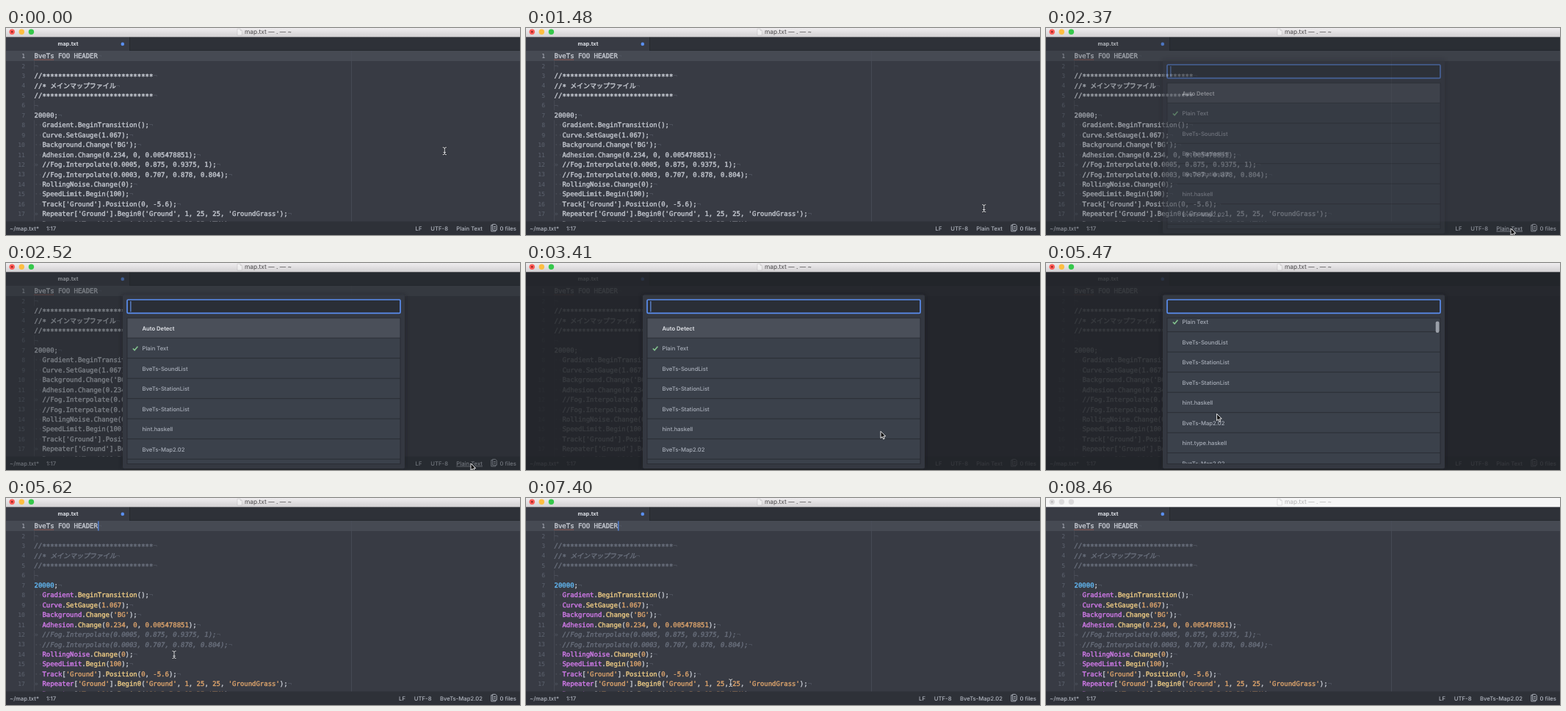
Recreate the animation shown at these times as an HTML page. Size 700x282 px, loop 8.56 s.

```html
<!DOCTYPE html>
<html lang="en">
<head>
<meta charset="utf-8">
<title>Editor</title>
<style>
html, body { margin: 0; width: 100%; height: 100%; overflow: hidden; background: #383b44; }
svg { display: block; width: 100vw; height: 100vh; }
text { fill: currentColor; font-family: Inter, sans-serif; font-size: 7.7px; font-weight: 500; text-rendering: geometricPrecision; }
.code text, .nums text { font: 8.96px "DejaVu Sans Mono", "Noto Sans CJK JP", "Noto Sans CJK", monospace; }
.code text { color: #c3c7cf; stroke: currentColor; stroke-width: .4px; }
.code .mark { color: #525762; stroke: none; }
.code .star { baseline-shift: -.8px; }
.nums text { font-size: 8.1px; color: #5d636f; text-anchor: end; }
.lit .c { color: #686e7b; font-style: italic; }
.lit .w { color: #d27bea; }
.lit .f { color: #ecca84; }
.lit .n, .lit .s { color: #daa26b; }
.lit .b { color: #62b8f3; }
.status { color: #b2b7c1; }
.end { text-anchor: end; }
.list { color: #a9afba; }
.bar { fill: url(#chrome); }
.title { color: #4a484a; font-size: 8.4px; font-weight: 400; }
.page { opacity: .5; }
.idle .bar { fill: #f6f6f6; }
.idle .title { color: #b4b3b4; }
.idle .light { fill: #dcdbdc; }
.idle .dirty { fill: #b4b3b4; }
</style>
</head>
<body>
<svg viewBox="0 0 700 282" preserveAspectRatio="none">
  <defs>
    <linearGradient id="chrome" x2="0" y2="1"><stop stop-color="#efedef"/><stop offset="1" stop-color="#d2d0d2"/></linearGradient>
    <clipPath id="pane"><rect y="31" width="700" height="233"/></clipPath>
    <clipPath id="rows"><rect x="165" y="75" width="372" height="199"/></clipPath>
    <filter id="soft" x="-10%" y="-10%" width="120%" height="120%"><feGaussianBlur stdDeviation="3"/></filter>
    <path id="ibeam" d="M-2.2 -5Q0 -5 0 -3.6Q0 -5 2.2 -5M0 -3.6V3.6M-1.4 1.8H1.4M-2.2 5Q0 5 0 3.6Q0 5 2.2 5"/>
  </defs>

  <g id="editor">
    <rect width="700" height="282" fill="#383b44"/>
    <rect y="12" width="700" height="19" fill="#2e3138"/>
    <rect y="12" width="168" height="19" fill="#383b44"/>
    <path d="M168.5 12V31M168.5 30.7H700" stroke="#24272d" stroke-width=".8"/>
    <text x="70.5" y="24.1" color="#dfe2e8" style="font-size:7.4px;font-weight:700">map.txt</text>
    <circle cx="158.8" cy="21.9" r="2.3" fill="#5a8ff0"/>
    <rect y="31" width="700" height="14" fill="#464a53"/>
    <path d="M470.5 31V264" stroke="#4b4f59" stroke-width=".8"/>
    <path d="M38.5 45V58.5M38.5 98.5V112M38.5 125.5V264" stroke="#4b4f59" stroke-width=".7"/>
    <g clip-path="url(#pane)"><g class="nums" id="nums"></g><g class="code" id="code"></g></g>
    <path d="M38.5 43.2H65" stroke="#d0604f" stroke-width="1" stroke-dasharray="1 1.1"/>
    <rect id="caret" x="125.2" y="31.5" width="1.2" height="13" fill="#5a90f2"/>

    <g class="status">
      <rect y="263.5" width="700" height="18.5" fill="#2e3138"/>
      <text x="5" y="275.7">~/map.txt*</text>
      <text x="55" y="275.7">1:17</text>
      <g id="enc">
        <text class="end" x="566.5" y="275.7">LF</text>
        <text class="end" x="602" y="275.7">UTF-8</text>
      </g>
      <text class="end" id="lang" x="649" y="275.7"></text>
      <g fill="none" stroke="#b2b7c1" stroke-width=".9">
        <path d="M662.5 268.5H660.8V277H666.8V275.5"/>
        <path d="M662.7 267.4H666.5L668.3 269.2V275.3H662.7ZM664 270.5H667M664 272.7H667"/>
      </g>
      <text class="end" x="695" y="275.7">0 files</text>
    </g>
  </g>

  <rect id="dim" y="12" width="700" height="270" fill="#212428"/>

  <g id="modal">
    <rect x="159" y="44" width="384" height="236" rx="2" fill="#15171a" opacity=".5" filter="url(#soft)"/>
    <rect x="159" y="43.5" width="384" height="236.5" rx="2" fill="#343841"/>
    <rect x="165" y="50" width="372" height="18.4" rx="1.5" fill="#2a2e36" stroke="#5b8def" stroke-width="1.7"/>
    <rect id="prompt" x="169.3" y="52" width="1.1" height="14.5" fill="#6a9bf5"/>
    <g clip-path="url(#rows)">
      <rect x="165" y="75" width="372" height="199" fill="#3b414b"/>
      <g class="list" id="list"></g>
    </g>
    <rect x="165" y="75" width="372" height="198.7" fill="none" stroke="#282b32" stroke-width=".9"/>
    <rect id="thumb" x="530.7" width="4.8" height="15.5" rx="2.2" fill="#9a9fa8"/>
  </g>

  <g id="window">
    <rect class="bar" width="700" height="12.3"/>
    <circle class="light" cx="8.2" cy="5.2" r="3.7" fill="#fc5b57"/>
    <circle class="dirty" cx="8.2" cy="5.2" r="1.2" fill="#8e1d18"/>
    <circle class="light" cx="21.3" cy="5.2" r="3.7" fill="#fdbe41"/>
    <circle class="light" cx="34.4" cy="5.2" r="3.7" fill="#35c84b"/>
    <path class="page" d="M315 1.2H319L321.3 3.5V10H315ZM319 1.2V3.5H321.3" fill="#fff" stroke="#a5a3a5" stroke-width=".6"/>
    <text class="title" x="325" y="8.3">map.txt — . — ~</text>
  </g>

  <g id="mouse">
    <g id="beam" fill="none" stroke-linecap="round">
      <use href="#ibeam" stroke="#26282d" stroke-width="2"/>
      <use href="#ibeam" stroke="#eceef2" stroke-width=".9"/>
    </g>
    <path id="arrow" d="M0 0V9.3L2.2 7.3L3.6 10.6L5.2 9.9L3.8 6.7H6.7Z" fill="#0c0c0d" stroke="#fff" stroke-width=".9" stroke-linejoin="round"/>
  </g>
</svg>
<script>
const $ = id => document.getElementById(id);
const LOOP = 8560, TICK = 148.2;
const LEFT = 38.6, COL = 5.394, ROW = 13.44, ITEM = 27.5;

const stars = '//' + '*'.repeat(28);
const source = `BveTs FOO HEADER

${stars}
//* メインマップファイル
${stars}

20000;
  Gradient.BeginTransition();
  Curve.SetGauge(1.067);
  Background.Change('BG');
  Adhesion.Change(0.234, 0, 0.005478851);
\t//Fog.Interpolate(0.0005, 0.875, 0.9375, 1);
  //Fog.Interpolate(0.0003, 0.707, 0.878, 0.804);
  RollingNoise.Change(0);
  SpeedLimit.Begin(100);
  Track['Ground'].Position(0, -5.6);
\tRepeater['Ground'].Begin0('Ground', 1, 25, 25, 'GroundGrass');
  Repeater['Track1'].Begin0('1',3,5,3,12,25,'TX');`.split('\n');

const languages = ['Auto Detect', 'Plain Text', 'BveTs-SoundList', 'BveTs-StationList', 'BveTs-StationList',
  'hint.haskell', 'BveTs-Map2.02', 'hint.type.haskell', 'BveTs-Map2.02', 'hint.message.haskell'];

const span = (kind, s) => `<tspan class="${kind}">${s}</tspan>`;

function highlight(line, row) {
  if (!row) return line;
  const token = /(\/\/.*)|('[^']*')|(-?\b\d[\d.]*)|([A-Z]\w*)/g;
  return line.replace(token, (m, comment, string, number, word, at) => {
    const kind = comment ? 'c' : string ? 's' : number ? (at ? 'n' : 'b') : at ? 'f' : 'w';
    return span(kind, m.replace(/\*+/, s => span('star', s)));
  });
}

const label = (x, y, s, cls = '') => `<text class="${cls}" x="${x}" y="${y}">${s}</text>`;

source.forEach((line, i) => {
  const y = 41.3 + i * ROW, body = line.trim();
  const indent = /^\s/.test(line) ? 2 : 0;
  const wide = i === 3 ? 10 * 8.96 + 4 * COL : body.length * COL;
  const x = LEFT + indent * COL;
  let out = label(x, y, highlight(body, i)) + label(x + wide, y, '¬', 'mark');
  if (indent) out += label(LEFT, y, line[0] === '\t' ? '»' : '··', 'mark');
  $('code').innerHTML += out;
  $('nums').innerHTML += `<text x="26" y="${y - .2}"${i ? '' : ' style="color:#b4b9c3"'}>${i + 1}</text>`;
});

$('list').innerHTML = languages.map((name, i) => {
  const y = 75 + i * ITEM;
  const back = i ? '' : `<rect x="165" y="75" width="372" height="${ITEM}" fill="#4a4f59"/>`;
  const tick = i === 1 ? `<path d="M172.8 ${y + 14}l2.3 2.3 4.3-5" fill="none" stroke="#84c58f" stroke-width="1.5"/>` : '';
  const style = i ? '' : ' style="color:#e3e6eb;font-weight:600"';
  return `${back}<path d="M165 ${y + ITEM - .3}H537" stroke="#292c33" stroke-width=".9"/>${tick}` +
    `<text x="185.5" y="${y + 16.5}"${style}>${name}</text>`;
}).join('');

// Ticks at which the blinking caret changes state.
const blinks = [2, 5, 8, 10, 13, 19, 21, 24, 27, 29, 32, 34, 37, 41, 43, 46, 48, 51, 54, 56];
// Pointer moves: start tick, end tick, target.
const moves = [[7, 11.5, 633, 273], [20, 27, 252, 162], [33, 37, 229, 213.5], [47, 51, 288, 259]];

const clamp = v => Math.max(0, Math.min(1, v));
const smooth = v => v * v * (3 - 2 * v);
const show = (id, on) => $(id).setAttribute('visibility', on ? 'visible' : 'hidden');

function pointer(n) {
  let x = 597.3, y = 167.6;
  for (const [from, to, tx, ty] of moves) {
    const k = smooth(clamp((n - from) / (to - from)));
    x += (tx - x) * k;
    y += (ty - y) * k;
  }
  return [x, y];
}

function draw(t) {
  const n = Math.floor(t / TICK + .08);
  const open = n >= 16 && n < 38, lit = n >= 38;
  const blink = blinks.filter(b => b <= n).length % 2 === 1;

  $('editor').setAttribute('class', lit ? 'lit' : '');
  $('window').setAttribute('class', n >= 57 ? 'idle' : '');
  show('caret', blink && !open);
  $('lang').textContent = lit ? 'BveTs-Map2.02' : 'Plain Text';
  $('enc').setAttribute('transform', `translate(${lit ? -22.5 : 0})`);

  $('dim').setAttribute('opacity', open ? .86 * clamp((n - 14.9) / 4) : 0);
  $('modal').setAttribute('opacity', open ? clamp((n - 15) / 2) : 0);
  show('prompt', open && blink);
  const scroll = 36 * clamp((n - 28) / 4) ** 2.47;
  $('list').setAttribute('transform', `translate(0 ${-scroll})`);
  $('thumb').setAttribute('y', 76.7 + scroll * .075);
  show('thumb', open && scroll > 0);

  const [x, y] = pointer(n);
  const onBar = y > 264, arrow = open || onBar, seen = n < 56;
  $('lang').setAttribute('text-decoration', onBar ? 'underline' : 'none');
  $('mouse').setAttribute('transform', `translate(${x} ${y})`);
  show('arrow', seen && arrow);
  show('beam', seen && !arrow);
}

const start = performance.now();
function frame() {
  draw((performance.now() - start) % LOOP);
  requestAnimationFrame(frame);
}
frame();
</script>
</body>
</html>
```
